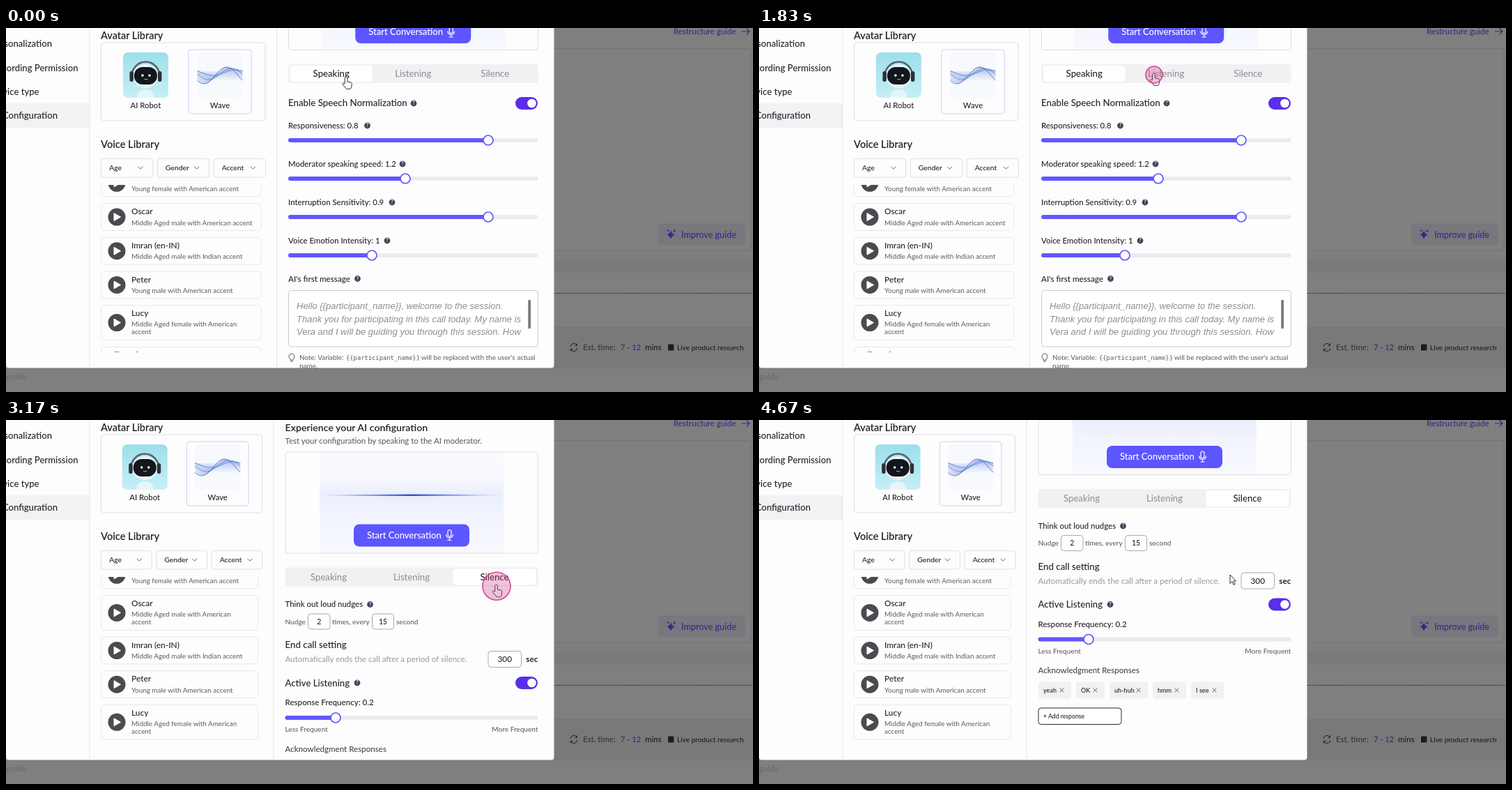
These frames come from a looping animation (1072x522 px, 4750 ms). An HTML page:

```html
<!DOCTYPE html>
<html lang="en">
<head>
<meta charset="utf-8">
<title>AI configuration</title>
<style>
html, body { margin: 0; width: 100%; height: 100%; overflow: hidden; background: #7f7f7f; }
svg { display: block; width: 100%; height: 100%; }
text { font-family: Lato, Inter, sans-serif; white-space: pre; }
</style>
</head>
<body>
<svg id="stage" viewBox="0 0 1072 522">
  <defs>
    <clipPath id="modalClip"><path d="M0 0H786V484a4 4 0 0 1-4 4H0z"/></clipPath>
    <clipPath id="listClip"><rect x="130" y="225" width="260" height="240"/></clipPath>
    <linearGradient id="sky" x2="0" y2="1"><stop stop-color="#9bdfea"/><stop offset="1" stop-color="#c6eff6"/></linearGradient>
    <linearGradient id="haze" x2="0" y2="1"><stop stop-color="#fafbfe"/><stop offset=".25" stop-color="#f6f8fe"/><stop offset=".43" stop-color="#eaeefd"/><stop offset=".65" stop-color="#f2f4fe"/><stop offset="1" stop-color="#f8f9fe"/></linearGradient>
    <linearGradient id="beam"><stop stop-color="#8fa6f5" stop-opacity=".4"/><stop offset=".5" stop-color="#2e4bd0"/><stop offset="1" stop-color="#8fa6f5" stop-opacity=".4"/></linearGradient>
  </defs>
</svg>
<script>
const INK = '#242428', GREY = '#8b8b90', LINE = '#dedee2', BLUE = '#6257ff', RIGHT = 763.5;

// Text: y is the middle of the capitals.
const text = (x, y, str, size, fill = INK, weight = 500, anchor = 'start', more = '') =>
  `<text x="${x}" y="${y + size * .36}" font-size="${size}" fill="${fill}" font-weight="${weight}" text-anchor="${anchor}" ${more}>${str}</text>`;
const box = (x1, y1, x2, y2, fill = 'none', stroke = 'none', r = 4, more = '') =>
  `<rect x="${x1}" y="${y1}" width="${x2 - x1}" height="${y2 - y1}" rx="${r}" fill="${fill}" stroke="${stroke}" ${more}/>`;
const dot = (x, y, r, fill, more = '') => `<circle cx="${x}" cy="${y}" r="${r}" fill="${fill}" ${more}/>`;
const path = (d, stroke, width = 1, fill = 'none', more = '') =>
  `<path d="${d}" stroke="${stroke}" stroke-width="${width}" fill="${fill}" ${more}/>`;
const group = (x, y, body, more = '') => `<g transform="translate(${x} ${y})" ${more}>${body}</g>`;

const chevron = (x, y) => path(`M${x - 3.5} ${y - 1.7}l3.5 3.5 3.5-3.5`, '#66666c');
const cross = (x, y, s = 3) => path(`M${x - s} ${y - s}l${2 * s} ${2 * s}m0 ${-2 * s}l${-2 * s} ${2 * s}`, '#55555c');
const help = (x, y) => dot(x, y, 4.4, '#44425a') + text(x, y, '?', 6.5, '#fff', 700, 'middle');
const toggle = y => box(731, y - 9, 763, y + 9, '#5a2eea', 'none', 9) + dot(754.5, y, 6.3, '#fff');
const slider = (x, y, knob) =>
  box(x, y - 3, RIGHT, y + 3, '#ececee', 'none', 3) + box(x, y - 3, knob, y + 3, BLUE, 'none', 3) +
  dot(knob, y, 7, '#fff', `stroke="${BLUE}" stroke-width="1.7"`);

function backdrop() {
  const purple = '#3f2585', dark = '#1d1d20';
  return box(0, 0, 1072, 522, '#7f7f7f', 'none', 0) +
    box(780, 29.5, 1069, 319, '#808080', '#727272', 3) +
    box(780, 333, 1072, 351, '#7a7a7a', 'none', 0) +
    box(780, 428, 1072, 488, '#797979', 'none', 0) +
    path('M786 380.5H1072', '#333', 1, 'none', 'stroke-dasharray="2.5 1.2"') +
    text(958, 5, 'Restructure guide', 11.5, purple) +
    path('M1056 5h11m-4.5-4.5l4.5 4.5-4.5 4.5', purple, 1.2) +
    box(936, 280, 1061, 311, '#78777d', 'none', 4) +
    path('M954 290q1 5 6 6.500q-5 1.500-6 6.500q-1-5-6-6.500q5-1.500 6-6.500z', 'none', 0, purple) +
    path('M959 289v4m-2-2h4M950 289v3m-1.500-1.500h3', purple) +
    text(969, 296, 'Improve guide', 12.6, purple) +
    path('M810 457a5 5 0 0 1 9-2.500m.5-2v3h-3M820 459a5 5 0 0 1-9 2.500m-.5 2v-3h3', dark) +
    text(828, 458, 'Est. time:', 11.5, '#303034', 400) +
    text(882, 458, '7 - 12', 11.1, purple) +
    text(917, 458, 'mins', 11.5, dark) +
    box(950, 453.5, 958.5, 462.5, dark, 'none', 1.5) +
    text(963, 458, 'Live product research', 10.1, dark) +
    text(0, 499.5, 'guide', 12.2, '#686868', 400);
}

function nav() {
  const items = [[66, 22, 'Personalization'], [103.5, 57, 'Recording Permission'], [47.5, 91, 'Device type'], [74, 125, 'AI Configuration']];
  return box(0, -5, 786.5, 487.5, '#fdfdfe', 'none', 4) + box(-5, 108, 120, 143, '#f2f2f5', 'none', 0) +
    path('M120 0V488', '#e6e6ea') + items.map(([x, y, s]) => text(x, y, s, 13.1, INK, 500, 'end')).join('');
}

const robot = (x, y) => group(x, y,
  box(0, 0, 65, 65, 'url(#sky)', 'none', 7) +
  path('M20 65q1-12 12.500-12t12.500 12z', 'none', 0, '#e6f5f9') +
  path('M12.500 34a20 20.500 0 0 1 40 0', '#59616b', 2.5) +
  `<ellipse cx="32.500" cy="34" rx="18.500" ry="17" fill="#eef3f6"/>` +
  box(9.5, 27, 15, 42, '#2a3037', 'none', 2.7) + box(50, 27, 55.500, 42, '#2a3037', 'none', 2.7) +
  box(16, 21, 49, 46, '#12161d', 'none', 12) +
  dot(28, 33, 1.8, '#fff') + dot(38, 33, 1.8, '#fff') + path('M30.500 38q2.500 2 5 0', '#dfe8ec', .8));

function wave(x, y) {
  let lines = '';
  for (let k = 0; k < 9; k++) {
    let d = '';
    for (let i = 0; i <= 65; i += 2.5) {
      const v = 31 + (4 + k) * Math.sin(i / 65 * 2 * Math.PI + (k - 4) * .16) + (k - 4) * .5;
      d += `${d ? 'L' : 'M'}${i} ${v.toFixed(1)}`;
    }
    lines += path(d, k % 4 ? '#8da6e2' : '#3b59b0', k % 4 ? .6 : .8, '#8da6e218');
  }
  return group(x, y, box(0, 0, 65, 65, '#f7f9fd', 'none', 3) + lines);
}

function voices(right, wrapped) {
  const list = [['Sophie', 'Young female with American'], ['Oscar', 'Middle Aged male with American'],
    ['Imran (en-IN)', 'Middle Aged male with Indian'], ['Peter', 'Young male with American'],
    ['Lucy', 'Middle Aged female with American'], ['Simon', 'Middle Aged male with American']];
  let y = 203, out = '';
  for (const [name, about] of list) {
    const wrap = wrapped.includes(name), h = wrap ? 49.5 : 38.7, mid = y + h / 2;
    const sub = (dy, s) => text(180, y + dy, s, 9.9, '#5c5c62', 400);
    out += box(136.5, y, right, y + h, '#fdfdfe', '#e7e7ea', 5) + dot(159, mid, 12.5, '#4b4b4f') +
      path(`M155 ${mid - 5.5}v11l9.500-5.500z`, '#fff', 1, '#fff', 'stroke-linejoin="round"') +
      text(180, y + 11.2, name, 11.9) +
      (wrap ? sub(27, about) + sub(38, 'accent') : sub(27.3, about + ' accent'));
    y += h + 10;
  }
  return `<g clip-path="url(#listClip)">${out}</g>`;
}

function library(left, wrapped) {
  const right = left - 33, width = right - 136;
  const bot = 136 + width * .273, wav = 136 + width * .7245, half = width * .1915;
  const step = (width - 13) / 3 + 6.5;
  return path(`M${left - 16.5} 0V488`, '#e2e2e6') +
    text(136, 10.5, 'Avatar Library', 14.4, INK, 600) +
    box(136.5, 21, right, 133, 'none', LINE) +
    robot(bot - 32.5, 35) + text(bot, 111, 'AI Robot', 11.3, INK, 500, 'middle') +
    box(wav - half, 31, wav + half, 123, '#fdfdff', '#d0cff2', 4) +
    wave(wav - 32.5, 35) + text(wav, 111, 'Wave', 11.3, INK, 500, 'middle') +
    text(136, 167, 'Voice Library', 14.6, INK, 600) +
    ['Age', 'Gender', 'Accent'].map((s, i) => {
      const x = 136.5 + i * step;
      return box(x, 187.5, x + step - 6.5, 214, 'none', LINE) + text(x + 11.5, 200.5, s, 10.4) + chevron(x + step - 24.5, 200.5);
    }).join('') + voices(right - 6, wrapped);
}

function preview(left, active) {
  const mid = (left + RIGHT) / 2, tab = (RIGHT - left - 6) / 3;
  return text(left, 10.5, 'Experience your AI configuration', 14.2, INK, 600) +
    text(left, 29.5, 'Test your configuration by speaking to the AI moderator.', 11.5, '#55555b', 400) +
    box(left + .5, 46, RIGHT, 191, 'none', LINE) +
    box(mid - 132, 47, mid + 132, 190, 'url(#haze)', 'none', 0) +
    path(`M${mid - 130} 107.800Q${mid} 105.300 ${mid + 130} 107.800Q${mid} 110.300 ${mid - 130} 107.800z`, 'none', 0, 'url(#beam)') +
    box(mid - 83, 149.5, mid + 83, 181.5, '#5d55ff', 'none', 8) +
    text(mid - 64, 165, 'Start Conversation', 13, '#fff') +
    box(mid + 52, 157.5, mid + 57, 167, 'none', '#fff', 2.5, 'stroke-width="1.2"') +
    path(`M${mid + 49.5} 164a5 5 0 0 0 10 0M${mid + 54.5} 169v3.500m-3 0h6`, '#fff', 1.2) +
    box(left, 211.5, RIGHT, 238.5, '#f1f1f4') +
    box(left + 3 + active * tab, 213.5, left + 3 + (active + 1) * tab, 236.5, '#fff') +
    ['Speaking', 'Listening', 'Silence'].map((s, i) =>
      text(left + 3 + (i + .5) * tab, 225, s, 13.2, i == active ? INK : GREY, i == active ? 500 : 400, 'middle')).join('');
}

function speaking(x) {
  const rows = [['Responsiveness: 0.8', 518.5, 692], ['Moderator speaking speed: 1.2', 569, 573],
    ['Interruption Sensitivity: 0.9', 554, 692], ['Voice Emotion Intensity: 1', 547, 525]];
  const message = ['Hello {{participant_name}}, welcome to the session.',
    'Thank you for participating in this call today. My name is',
    'Vera and I will be guiding you through this session. How'];
  const arial = 'font-style="italic" style="font-family:\'Liberation Sans\',Arial,sans-serif"';
  const note = '#5c5c62';
  return text(x, 107.5, 'Enable Speech Normalization', 13.3) + help(585, 108) + toggle(108) +
    rows.map(([s, hx, knob], i) => text(x, 139.5 + 55 * i, s, 11.4) + help(hx, 140 + 55 * i) + slider(x, 161 + 55 * i, knob)).join('') +
    text(x, 359.5, "AI's first message", 11.7) + help(504.5, 359.5) +
    box(x + .5, 376.5, RIGHT, 457, '#fff', '#cbcbd0') +
    message.map((s, i) => text(417, 398.5 + 18.5 * i, s, 13, '#8d8d92', 400, 'start', arial)).join('') +
    box(749.3, 390, 753, 431, '#77777c', 'none', 1) +
    path('M408 474.500a4 4 0 1 1 4 0v2h-4zm.5 4h3', '#55555b') +
    text(421, 472.5, 'Note: Variable:', 9.9, note, 400) +
    text(488, 472.5, '{{participant_name}}', 8.8, note, 400, 'start', 'style="font-family:\'DejaVu Sans Mono\',monospace"') +
    text(596, 472.5, "will be replaced with the user's actual", 10, note, 400) +
    text(421, 484.5, 'name.', 10, note, 400);
}

function listening(x) {
  return text(x, 264, 'Language', 11.8) + box(x + .5, 278.5, RIGHT, 309, 'none', LINE) +
    text(429, 294, 'English - US', 10.2) + chevron(744, 294) +
    text(x, 320.5, 'Expected keywords', 11.6) +
    box(x, 333.5, 498.5, 361, '#f1f1f4') + text(424, 347.5, 'Fieldovia', 10.3) + cross(482, 347.5, 3.5) +
    box(x + .5, 371.5, RIGHT, 404, 'none', LINE) +
    text(433, 388, 'Type here...', 10, '#9a9aa0', 400) + text(730, 388, 'Add', 9.9);
}

function silence(x) {
  const chips = [[401, 448, 'yeah'], [455, 496, 'OK'], [503, 558, 'uh-huh'], [565, 613, 'hmm'], [620, 667, 'I see']];
  const field = (x1, x2, y, h, s, size) => box(x1, y - h, x2, y + h, '#fff', '#a9a9ae') + text((x1 + x2) / 2, y, s, size, INK, 500, 'middle');
  const small = (px, y, s, anchor) => text(px, y, s, 10.1, '#55555b', 400, anchor);
  return text(x, 264, 'Think out loud nudges', 11.4) + help(522.5, 264.5) +
    small(x, 289, 'Nudge') + field(433.5, 465, 289, 11, '2', 10.5) + small(468, 289, 'times, every') +
    field(525.5, 556.5, 289, 11, '15', 10.5) + small(560, 289, 'second') +
    text(x, 322.5, 'End call setting', 13.3) +
    text(x, 343, 'Automatically ends the call after a period of silence.', 11.6, '#98989d', 400) +
    field(692, 739.5, 343, 11.5, '300', 11.8) + text(RIGHT, 343, 'sec', 11.8, INK, 700, 'end') +
    text(x, 377, 'Active Listening', 13.2) + help(504, 377) + toggle(377) +
    text(x, 405, 'Response Frequency: 0.2', 11.6) + slider(x, 427, 473) +
    small(x, 443.5, 'Less Frequent') + small(RIGHT, 443.5, 'More Frequent', 'end') +
    text(x, 471.5, 'Acknowledgment Responses', 11.6, '#38383d', 400) +
    chips.map(([a, b, s]) => box(a, 488, b, 512, '#f1f1f4') + text(a + 7, 500, s, 9.1) + cross(b - 13.5, 500, 2.7)).join('') +
    box(x + .5, 525.5, 520, 549, '#fff', '#2a2a2e') + text(408, 537, '+ Add response', 8.7);
}

const view = (left, wrapped, active, shift, body) =>
  `<g class="view" clip-path="url(#modalClip)">${library(left, wrapped)}<g class="pane">${group(0, shift, preview(left, active))}${body(left)}</g></g>`;

const stage = document.getElementById('stage');
stage.innerHTML += backdrop() + nav() +
  view(405, ['Lucy'], 0, -159.5, speaking) +
  view(415, [], 1, 0, listening) +
  view(400.5, ['Oscar', 'Lucy'], 2, 0, silence) +
  '<g id="cursor">' +
  path('M0 0c1.200 0 1.900.8 1.900 1.900v5l4.600 1c1.400.3 2 1.200 1.800 2.600l-.6 4.300c-.2 1.600-1.200 2.700-2.800 2.700h-3c-1 0-1.800-.4-2.400-1.200l-4.200-5.400c-.9-1.200.4-2.600 1.800-1.800l1.100.7v-8c0-1 .8-1.800 1.800-1.800z', '#2b2b2e', 1, '#fff', 'id="hand"') +
  path('M0 0v12.500l3-2.800 2.200 4.800 2-1-2.200-4.600h3.500z', '#2b2b2e', 1, '#fff', 'id="arrow"') +
  dot(.5, 2, 20, '#d0488f55', 'id="ring" stroke="#d2458f" stroke-width="1.6"') + '</g>';

const get = id => document.getElementById(id);
const views = stage.querySelectorAll('.view'), silencePane = stage.querySelectorAll('.pane')[2];
const show = (el, on) => el.setAttribute('display', on ? 'inline' : 'none');

// Cursor stops as [step, x, y]; the clock runs at 12 steps per second.
const stops = [[0, 488, 70], [13, 488, 70], [14, 488, 69], [16, 488, 69], [19, 566.5, 65], [28, 566.5, 65],
  [30, 632, 160], [32, 677, 220], [35, 703.5, 236], [51, 703.5, 237], [53, 696, 232], [54, 696, 232], [56, 676, 222], [57, 676, 222]];
const clicks = [3, 22, 36], RING_STEPS = 5;

function draw(now) {
  // Steps begin on times rounded to 10 ms, hence the small lead.
  const step = Math.min(56, Math.floor((now % 4750) * 12 / 1000 + .05));
  const active = step < 24 ? 0 : step < 38 ? 1 : 2;
  views.forEach((v, i) => show(v, i == active));
  const scroll = step < 46 ? 0 : step < 47 ? 62 : 112.5;
  silencePane.setAttribute('transform', `translate(0 ${-scroll})`);

  const n = stops.findIndex(s => s[0] > step);
  const [a, b] = [stops[n - 1], stops[n]], f = (step - a[0]) / (b[0] - a[0]);
  const x = a[1] + (b[1] - a[1]) * f, y = a[2] + (b[2] - a[2]) * f;
  get('cursor').setAttribute('transform', `translate(${x} ${y})`);
  const pointing = step < 46 && !(step > 28 && y < 211);
  show(get('hand'), pointing);
  show(get('arrow'), !pointing);

  const click = clicks.find(c => step >= c && step < c + RING_STEPS);
  show(get('ring'), click !== undefined);
  if (click !== undefined) get('ring').setAttribute('r', Math.min(20, 12 + 4 * (step - click)));
}

const start = performance.now();
(function tick() {
  draw(performance.now() - start);
  requestAnimationFrame(tick);
})();
</script>
</body>
</html>
```
